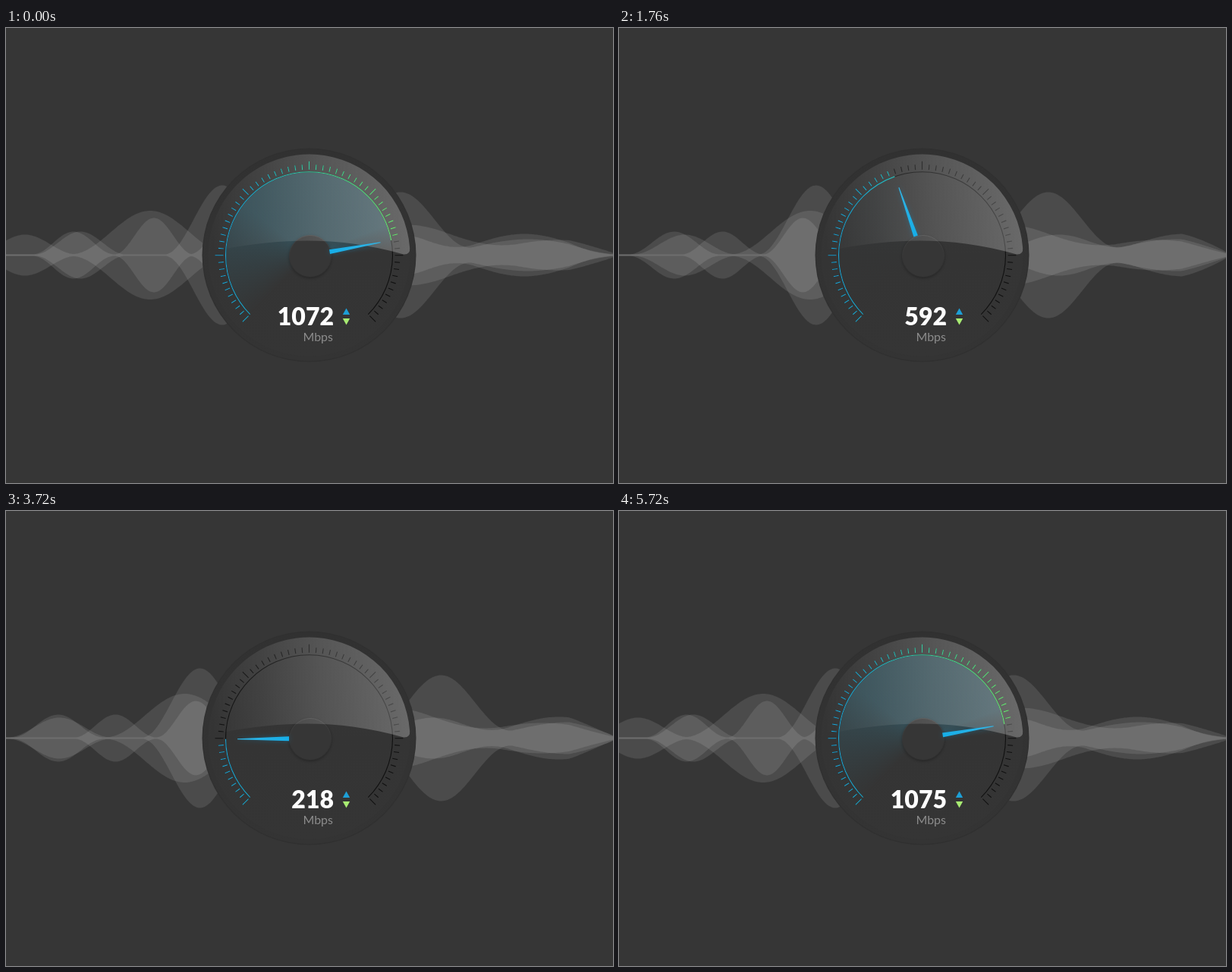
Recreate the animation shown at these times as an HTML page with a canvas. Size 800x600 px, loop 5760 ms.

```html
<!DOCTYPE html>
<html lang="en">
<head>
<meta charset="utf-8">
<title>Speed gauge</title>
<style>
  html, body { margin: 0; width: 100%; height: 100%; overflow: hidden; background: #363636; }
  canvas { display: block; width: 800px; height: 600px; }
</style>
</head>
<body>
<canvas id="stage" width="800" height="600"></canvas>
<script>
const ctx = document.getElementById('stage').getContext('2d');
const LOOP = 5760, STEP = 40;
const CX = 399.5, CY = 299.5, TAU = Math.PI * 2, START = Math.PI * 0.75;

const rad = deg => deg * Math.PI / 180;
const clamp = v => Math.max(0, Math.min(1, v));
const smooth = u => u * u * (3 - 2 * u);
const steep = u => u ** 2.3 / (u ** 2.3 + (1 - u) ** 2.3);
const ramp = (t, from, to, ease = smooth) => ease(clamp((t - from) / (to - from)));

// Up to a first peak, down to zero, a rest, up to a second peak and home
const swing = (t, home, peak1, peak2) =>
  home + (peak1 - home) * ramp(t, 0, 1062) - peak1 * ramp(t, 1062, 2456) +
  peak2 * ramp(t, 3128, 5298) - (peak2 - home) * ramp(t, 5298, LOOP);

const swayAt = t => ramp(t, 0, 2820, steep) - ramp(t, 3020, 5460, steep);
const driftAt = t => 190 + 74 * ramp(t, 0, 1280) - 54 * ramp(t, 1280, 2840) +
  32 * ramp(t, 3040, 4000) - 52 * ramp(t, 4000, 5700);

// A rounded bump around a centre, zero beyond its half width
const lobe = (center, height, half) => x => {
  const d = Math.abs(x - center) / half;
  return d < 1 ? height * Math.cos(d * Math.PI / 2) ** 2 : 0;
};

function ribbon(from, to, ...lobes) {
  const half = x => {
    const sum = lobes.reduce((h, f) => h + f(x), 0);
    return 1 + sum * Math.sqrt(clamp((802 - x) / 60));
  };
  ctx.beginPath();
  for (let x = from; x <= to; x += 2) ctx.lineTo(x, CY - half(x));
  for (let x = to; x >= from; x -= 2) ctx.lineTo(x, CY + half(x));
  ctx.fill();
}

function drawWaves(t) {
  const sway = swayAt(t), drift = driftAt(t);
  ctx.fillStyle = 'rgba(255,255,255,.1)';

  const outer = 285 - 33 * sway, inner = 195 + 62 * sway;
  ribbon(0, 400, lobe(outer, 91, 76), lobe(outer - 187, 30, 60));
  ribbon(0, 400, lobe(drift, 57.5, 105), lobe(drift - 165, 26, 68));
  ribbon(0, 400, lobe(inner, 48, 52), lobe(inner - 106, 30, 54), lobe(inner + 92, 32, 45));

  const big = 520 + 60 * sway, far = drift + 493, near = 528 - 24 * sway;
  ribbon(400, 800, lobe(big, 82, 96), lobe(big + 168, 20, 140));
  ribbon(400, 800, lobe(far, 27, 130), lobe(far - 165, 26, 100));
  ribbon(400, 800, lobe(near, 39, 150), lobe(near + 200, 19, 150));
}

function disc(x, y, r, fill) {
  ctx.beginPath();
  ctx.arc(x, y, r, 0, TAU);
  ctx.fillStyle = fill;
  ctx.fill();
}

function linear(x0, y0, x1, y1, ...stops) {
  const g = ctx.createLinearGradient(x0, y0, x1, y1);
  stops.forEach(([p, c]) => g.addColorStop(p, c));
  return g;
}

function drawBody() {
  disc(CX, CY, 141, '#303030');
  disc(CX, CY, 139.5, linear(0, 160, 0, 440, [0, '#313131'], [1, '#343434']));
  disc(CX, CY, 133, linear(0, 166, 0, 433, [0, '#383838'], [.5, '#343434'], [1, '#353535']));
}

function drawTint(speed, angle) {
  const strength = 0.26 * clamp((speed - 560) / 480);
  if (!strength) return;
  const tint = a => `rgba(55,150,180,${a * strength})`;
  const end = angle / 360;
  const g = ctx.createConicGradient(START, CX, CY);
  g.addColorStop(0, tint(0));
  g.addColorStop(.125, tint(.55));
  g.addColorStop(.23, tint(1));
  g.addColorStop(end - .03, tint(1));
  g.addColorStop(end + .02, tint(0));
  disc(CX, CY, 109.5, g);
}

function drawGloss() {
  ctx.beginPath();
  ctx.arc(CX, CY, 133, Math.PI * 1.02, TAU - .07);
  ctx.quadraticCurveTo(533, 299, 524, 298.5);
  ctx.bezierCurveTo(440, 275, 370, 277, 290, 291);
  ctx.closePath();
  ctx.fillStyle = linear(272, 0, 530, 0,
    [0, 'rgba(255,255,255,0)'], [.25, 'rgba(255,255,255,.06)'],
    [.55, 'rgba(255,255,255,.15)'], [1, 'rgba(255,255,255,.26)']);
  ctx.fill();
}

function drawScale(sweep, color) {
  const cy = CY + .3;
  ctx.lineWidth = 1.1;
  ctx.strokeStyle = color;
  ctx.beginPath();
  ctx.arc(CX, cy, 110, START, START + rad(sweep));
  for (let i = 0; i <= 60 && i * 4.5 <= sweep; i++) {
    const a = START + rad(i * 4.5), r = i % 10 ? 120 : 124;
    ctx.moveTo(CX + 113 * Math.cos(a), cy + 113 * Math.sin(a));
    ctx.lineTo(CX + r * Math.cos(a), cy + r * Math.sin(a));
  }
  ctx.stroke();
}

function drawNeedle(angle) {
  ctx.save();
  ctx.translate(400, 300);
  ctx.rotate(START + rad(angle));
  ctx.shadowColor = 'rgba(0,160,230,.3)';
  ctx.shadowBlur = 6;
  ctx.beginPath();
  ctx.moveTo(27, -2.9);
  ctx.lineTo(95, -.5);
  ctx.lineTo(95, .5);
  ctx.lineTo(27, 2.9);
  ctx.fillStyle = linear(27, 0, 95, 0, [0, '#16aee8'], [1, '#32b4e4']);
  ctx.fill();
  ctx.restore();
}

function drawHub() {
  ctx.save();
  ctx.shadowColor = 'rgba(0,0,0,.35)';
  ctx.shadowBlur = 4;
  ctx.shadowOffsetY = 1;
  disc(401, 301, 27.5, '#363636');
  ctx.restore();
  ctx.lineWidth = 1;
  ctx.strokeStyle = linear(0, 273, 0, 329, [0, '#484848'], [.5, '#373737'], [1, '#2c2c2c']);
  ctx.stroke();
}

function triangle(y, tip, color) {
  ctx.beginPath();
  ctx.moveTo(443.8, y);
  ctx.lineTo(453.2, y);
  ctx.lineTo(448.5, tip);
  ctx.fillStyle = color;
  ctx.fill();
}

function drawReadout(speed) {
  ctx.textAlign = 'right';
  ctx.fillStyle = '#fff';
  ctx.font = '900 32px Lato, sans-serif';
  ctx.fillText(Math.round(speed), 432, 391.5);
  ctx.fillStyle = '#8c8c8c';
  ctx.font = '400 16px Lato, sans-serif';
  ctx.fillText('Mbps', 431, 413);
  triangle(378, 369.5, '#1d9fd6');
  triangle(383, 391.5, '#a8ec72');
}

const litColor = linear(276, 0, 524, 0,
  [0, '#1fa0d2'], [.2, '#22aecf'], [.5, '#36c89e'], [.75, '#4fdc82'], [1, '#70e66e']);

function draw(t) {
  const speed = swing(t, 1072, 1187, 1195);
  const angle = swing(t, 214.6, 232.2, 243.7);
  ctx.fillStyle = '#363636';
  ctx.fillRect(0, 0, 800, 600);
  drawWaves(t);
  drawBody();
  drawTint(speed, angle);
  drawScale(270, '#101010');
  drawHub();
  drawGloss();
  if (angle > .3) drawScale(angle, litColor);
  drawNeedle(angle);
  drawReadout(speed);
}

const origin = performance.now();
function loop(now) {
  const t = Math.max(0, now - origin) % LOOP;
  draw(Math.floor(t / STEP + .05) * STEP);
  requestAnimationFrame(loop);
}
draw(0);
requestAnimationFrame(loop);
</script>
</body>
</html>
```
